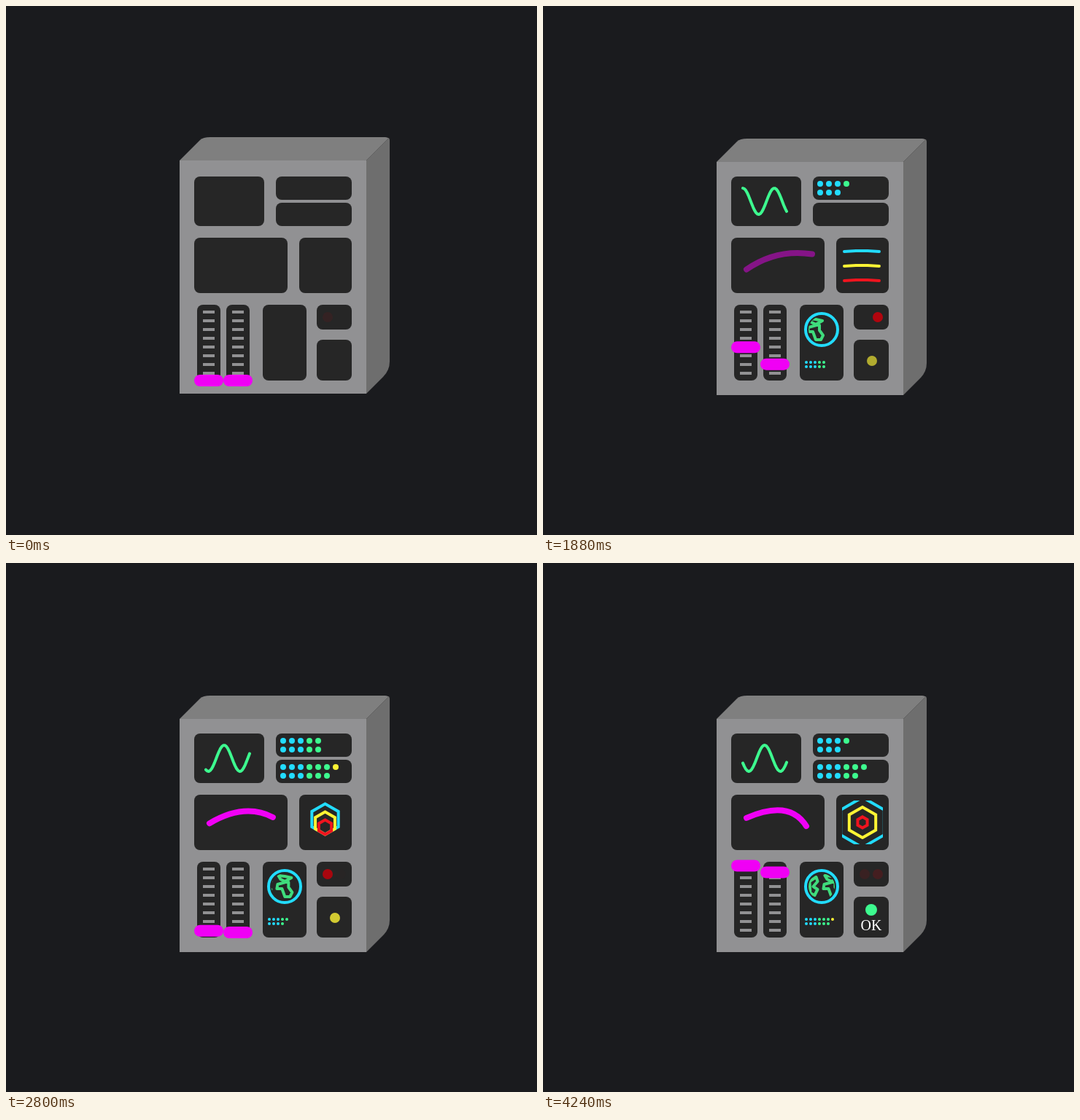
Animation of 728x726 px, one loop 5.2 s. Source, as an HTML page:

```html
<!DOCTYPE html>
<html lang="en">
<head>
<meta charset="utf-8">
<title>Control panel</title>
<style>
  html, body { margin: 0; width: 100%; height: 100%; overflow: hidden; background: #1a1b1e; }
  svg { display: block; width: 100vw; height: 100vh; }
</style>
</head>
<body>
<svg viewBox="0 0 728 726">
  <defs>
    <clipPath id="globeClip"><circle cx="382" cy="444" r="18"/></clipPath>
    <clipPath id="ringClip"><rect x="410" y="326" width="56" height="60"/></clipPath>
  </defs>
  <g id="cabinet">
    <path fill="#7f7f7f" d="M238 214L266 186Q270 182 280 182H520Q526 182 526 188L494 214Z"/>
    <path fill="#6e6e6e" d="M494 214L525 183Q526 185 526 188V490Q526 502 517 511L494 534Z"/>
    <path stroke="#626262" d="M494 214L525 183"/>
    <rect x="238" y="214" width="256" height="320" fill="#919193"/>
  </g>
  <g fill="#262626">
    <rect x="258" y="234" width="96" height="68" rx="8"/>
    <rect x="370" y="234" width="104" height="32" rx="8"/>
    <rect x="370" y="270" width="104" height="32" rx="8"/>
    <rect x="258" y="318" width="128" height="76" rx="8"/>
    <rect x="402" y="318" width="72" height="76" rx="8"/>
    <rect x="262" y="410" width="32" height="104" rx="8"/>
    <rect x="302" y="410" width="32" height="104" rx="8"/>
    <rect x="352" y="410" width="60" height="104" rx="8"/>
    <rect x="426" y="410" width="48" height="34" rx="8"/>
    <rect x="426" y="458" width="48" height="56" rx="8"/>
  </g>
  <g id="ticks" fill="#919193"></g>
  <g fill="none" stroke-linecap="round" stroke-linejoin="round">
    <path id="wave" stroke="#3dfa8f" stroke-width="4"/>
    <path id="arc" stroke="#f000f5" stroke-width="8"/>
  </g>
  <g id="rings" clip-path="url(#ringClip)" fill="none" stroke-width="4" stroke-linecap="round"></g>
  <g id="globe">
    <g clip-path="url(#globeClip)">
      <g id="land" fill="none" stroke="#3fdc7c" stroke-width="4" stroke-linejoin="round">
        <path d="M377 429L386 430L395 432L386 437L380 434Z"/>
        <path d="M387 438L376 441L375 447L382 447L386 458L393 458L396 452L391 445L391 438Z"/>
        <path d="M356 437L365 431L367 437L361 444L367 448L363 456L357 453Z"/>
      </g>
    </g>
    <circle cx="382" cy="444" r="22" fill="none" stroke="#22dcff" stroke-width="4"/>
  </g>
  <g id="dots"></g>
  <circle id="lampLeft" cx="441" cy="427" r="7" fill="#c6000a"/>
  <circle id="lampRight" cx="459" cy="427" r="7" fill="#c6000a"/>
  <circle id="amber" cx="451" cy="487" r="7" fill="#fcf334"/>
  <g id="ok">
    <circle cx="450" cy="476" r="8" fill="#3dfa8f"/>
    <text x="450" y="504" text-anchor="middle" fill="#fff" font-size="20"
      font-family="'Liberation Serif', serif">OK</text>
  </g>
  <g fill="#f000f5">
    <rect id="sliderLeft" x="258" width="40" height="16" rx="8"/>
    <rect id="sliderRight" x="298" width="40" height="16" rx="8"/>
  </g>
</svg>
<script>
const LOOP = 5200, STEP = 40, END = 4240;
const CYAN = "#22dcff", GREEN = "#3dfa8f", YELLOW = "#fcf334", RED = "#f0141e";
const $ = id => document.getElementById(id);

function add(parent, tag, attrs) {
  const el = document.createElementNS("http://www.w3.org/2000/svg", tag);
  set(el, attrs);
  parent.appendChild(el);
  return el;
}

function set(el, attrs) {
  for (const name in attrs) el.setAttribute(name, attrs[name]);
}

const show = (el, on) => set(el, { visibility: on ? "visible" : "hidden" });
const mix = (a, b, k) => a + (b - a) * k;
const ramp = (t, from, to) => Math.min(1, Math.max(0, (t - from) / (to - from)));
const pulse = (t, dark, period) => Math.sin(Math.PI * (t - dark) / period) ** 2;
const bell = (t, centre, width) => Math.exp(-(((t - centre) / width) ** 2));

for (const x of [270, 310])
  for (let y = 418; y < 510; y += 12) add($("ticks"), "rect", { x, y, width: 16, height: 4 });

// Dots fill column by column, two per column.
function meter(x, y, pitch, r) {
  const dots = Array.from({ length: 16 }, (_, i) => {
    const col = i >> 1;
    return add($("dots"), "circle", {
      cx: x + col * pitch, cy: y + (i % 2) * pitch, r,
      fill: col < 3 ? CYAN : col < 6 ? GREEN : YELLOW
    });
  });
  return count => dots.forEach((dot, i) => show(dot, i < Math.round(count)));
}

const upperMeter = meter(380, 244, 12, 4);
const lowerMeter = meter(380, 280, 12, 4);
const smallMeter = meter(361, 489, 6, 2);

function drawMeters(t) {
  upperMeter(Math.min((t - 1720) / 23, 7 + 5 * bell(t, 2450, 520)));
  lowerMeter(Math.min((t - 1900) / 23, 12 + Math.sin((t - 2400) / 430)));
  smallMeter(Math.min((t - 740) / 46, 10 - 3 * bell(t, 3200, 300) + 3 * ramp(t, 3440, END)));
}

function drawWave(t) {
  const u = t - 1880;
  const peak = 274 - u * (0.0705 - 4.2e-6 * u);
  const points = [];
  for (let x = 274; x <= 334; x += 2)
    points.push([x, 268 - 18 * Math.cos((x - peak) * 2 * Math.PI / 43.2)]);
  set($("wave"), { d: "M" + points.join("L") });
  show($("wave"), t >= 1000);
}

// A bow that tilts steadily while its bulge swells and flattens.
function drawArc(t) {
  const u = t - 1880;
  const bulge = 36 * pulse(t, 3440, 2080);
  const tilt = 0.0137 * u - 21;
  const y = 345 + bulge / 3;
  set($("arc"), {
    d: `M279 ${y - tilt / 2}Q${320 + 0.0076 * u} ${y - bulge} ${369 - 0.0034 * u} ${y + tilt / 2}`,
    opacity: ramp(t, 1720, 2060)
  });
}

const rings = [CYAN, YELLOW, RED].map(stroke => add($("rings"), "path", { stroke }));

// Six equal segments bend from a straight line into a closed hexagon.
function drawRings(t) {
  const gather = ramp(t, 1880, 2400), grow = ramp(t, 2400, 3200);
  const turn = Math.PI / 3 * ramp(t, 1860, 2680);
  const spread = mix(11, 13.4, ramp(t, 3200, END));
  const cx = 437 + grow;
  rings.forEach((ring, i) => {
    const radius = 21 + (1 - i) * spread;
    const side = mix(mix(8, 10, gather), radius, grow) * ramp(t, 1300, 1640);
    const top = mix(mix(356, 348, gather), 335, grow) + (i - 1) * mix(20, spread, gather);
    const half = [[0, 0]];
    for (let n = 0; n < 3; n++) {
      const angle = (n + 0.5) * turn, [x, y] = half[n];
      half.push([x + side * Math.cos(angle), y + side * Math.sin(angle)]);
    }
    const points = [...half.slice(1).reverse().map(([x, y]) => [-x, y]), ...half]
      .map(([x, y]) => [cx + x, top + y]);
    set(ring, { d: "M" + points.join("L") });
  });
  show($("rings"), t > 1300);
}

// One swing up and back to the bottom, then an eased climb to the top.
function slider(t, begin, turn, swing, top) {
  const climb = 1 - (1 - ramp(t, turn, END)) ** 1.8;
  return 506 - swing * Math.sin(Math.PI * ramp(t, begin, turn)) - (514 - top) * climb;
}

function draw(t) {
  set($("cabinet"), { transform: `translate(0 ${mix(-2, 0, ramp(t, 0, 80))})` });
  drawWave(t);
  drawArc(t);
  drawRings(t);
  drawMeters(t);

  set($("globe"), { opacity: ramp(t, 1240, 1480) });
  set($("land"), { transform: `translate(${(t - 3200) * 0.0091} 0)` });

  set($("lampLeft"), { opacity: 0.85 * pulse(t, 1880, 2100) });
  set($("lampRight"), { opacity: t > 880 ? 0.88 * pulse(t, 2720, 1800) : 0 });
  set($("amber"), { opacity: ramp(t, 640, 880) * (0.3 + 0.6 * pulse(t, 1160, 2600)) });
  show($("amber"), t < 3480);
  show($("ok"), t >= 3480);

  set($("sliderLeft"), { y: slider(t, 1160, 2720, 46, 415.5) });
  set($("sliderRight"), { y: slider(t, 1680, 2860, 44, 424.5) });
}

const start = performance.now();
function tick() {
  const elapsed = (performance.now() - start) % LOOP;
  draw(Math.min(END, Math.floor(elapsed / STEP) * STEP));
  requestAnimationFrame(tick);
}
tick();
</script>
</body>
</html>
```
